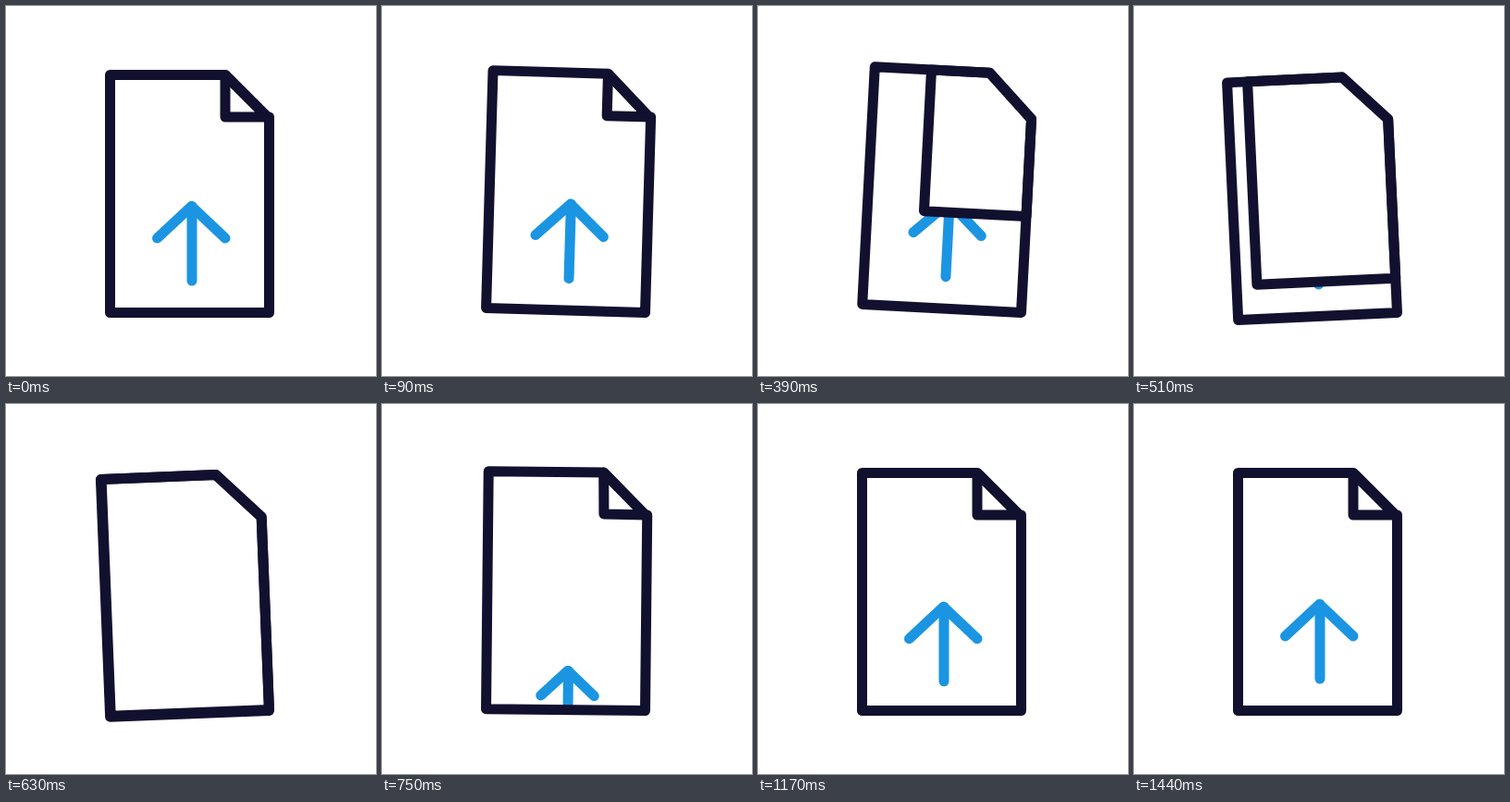
An HTML page without scripts that plays this animation: 400x400 px, repeating every 1.65 s.

```html
<!DOCTYPE html>
<html lang="en">
<head>
<meta charset="utf-8">
<title>File upload icon</title>
<style>
  html, body { margin: 0; width: 100%; height: 100%; overflow: hidden; background: #fff; }
  svg { display: block; width: 100vw; height: 100vh; }
  .ink { stroke: #11112f; }
  .arrow { stroke: #1b95e2; }
  .fold { fill: #fff; }
</style>
</head>
<body>
<svg viewBox="0 0 400 400" fill="none" stroke-width="11" stroke-linecap="round" stroke-linejoin="round">
  <clipPath id="sheet"><path d="M112.5 74.5H284.5V331.5H112.5Z"/></clipPath>

  <!-- The sheet rocks around its bottom right corner -->
  <g>
    <animateTransform attributeName="transform" type="rotate" dur="1.65s" repeatCount="indefinite" calcMode="spline"
      values="0 284.5 331.5; 7 284.5 331.5; -3 284.5 331.5; 2 284.5 331.5; 0 284.5 331.5; 0 284.5 331.5"
      keyTimes="0; .1636; .3303; .5273; .6909; 1"
      keySplines=".42 0 .58 1; .42 0 .58 1; .42 0 .58 1; .42 0 .58 1; 0 0 1 1"/>

    <!-- A new arrow rises once the old one is covered -->
    <g class="arrow" clip-path="url(#sheet)">
      <g>
        <animateTransform attributeName="transform" type="translate" dur="1.65s" repeatCount="indefinite" calcMode="spline"
          values="0 0; 0 0; 0 118; 0 0; 0 0" keyTimes="0; .3879; .3879; .84; 1"
          keySplines="0 0 1 1; 0 0 1 1; .333 1 .667 1; 0 0 1 1"/>
        <path d="M201 216.5V297"/>
        <path d="M163.5 251L200.5 216.5L237 251">
          <animate attributeName="d" dur="1.65s" repeatCount="indefinite" calcMode="spline"
            values="M163.5 251L200.5 216.5L237 251; M163.5 251L200.5 216.5L237 251; M188 228L200.5 216.5L213 228; M163.5 251L200.5 216.5L237 251; M163.5 251L200.5 216.5L237 251"
            keyTimes="0; .3879; .3879; .5455; 1"
            keySplines="0 0 1 1; 0 0 1 1; .333 .667 .667 1; 0 0 1 1"/>
        </path>
      </g>
    </g>

    <!-- The fold opens over the whole sheet, then a fresh one turns in -->
    <path class="ink fold" d="M237 74.5L237 120L284.5 120L284.5 122L237 74.5Z">
      <animate attributeName="d" dur="1.65s" repeatCount="indefinite" calcMode="spline"
        values="M237 74.5L237 120L284.5 120L284.5 122L237 74.5Z;
                M237 74.5L237 120L284.5 120L284.5 122L237 74.5Z;
                M112.5 74.5L112.5 331.5L284.5 331.5L284.5 122L237 74.5Z;
                M237 74.5L261 98L284.5 122L284.5 122L237 74.5Z;
                M237 74.5L237 120L284.5 120L284.5 122L237 74.5Z;
                M237 74.5L237 120L284.5 120L284.5 122L237 74.5Z"
        keyTimes="0; .1455; .3879; .3879; .4848; 1"
        keySplines="0 0 1 1; .333 .47 .667 .93; 0 0 1 1; .333 1 .667 1; 0 0 1 1"/>
    </path>
    <path class="ink" d="M112.5 74.5H237L284.5 122V331.5H112.5Z"/>
  </g>
</svg>
</body>
</html>
```
